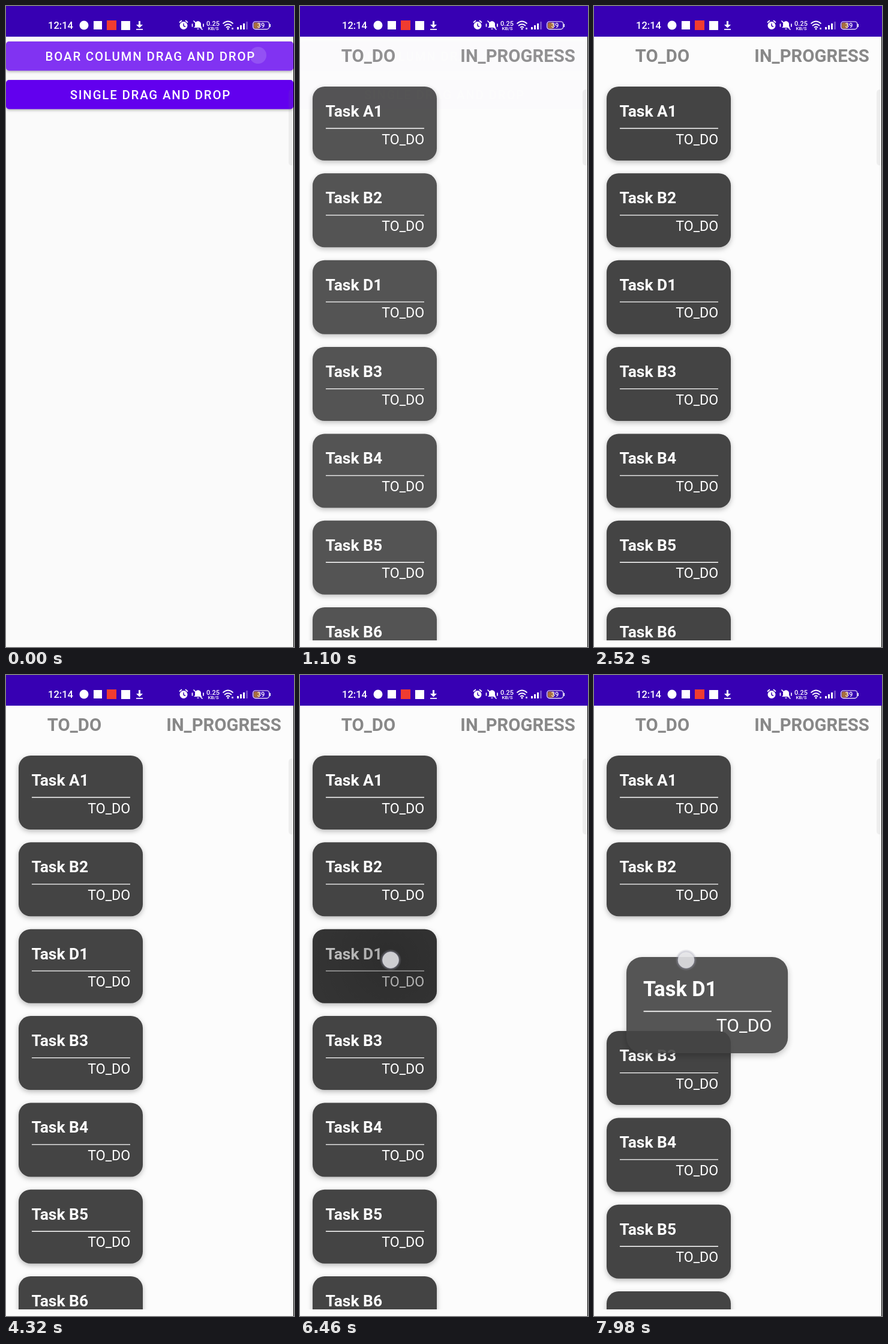
Recreate the animation shown at these times as an HTML page. Size 480 by 1066 pixels, loop 8 s.

```html
<!DOCTYPE html>
<html lang="en">
<head>
<meta charset="utf-8">
<title>Drag and drop board</title>
<style>
  html, body { margin: 0; width: 100%; height: 100%; overflow: hidden; }
  svg { display: block; width: 100vw; height: 100vh; font-family: Roboto, sans-serif; }
  .card { filter: drop-shadow(0 3px 4px rgba(0, 0, 0, .27)); }
  .card rect { fill: #444; }
  .title { font-weight: 700; font-size: 26.4px; fill: #fff; }
  .state { font-weight: 400; font-size: 23.2px; fill: #fff; text-anchor: end; }
  .header { font-weight: 700; font-size: 29.3px; fill: #888; text-anchor: middle; }
  .button rect { fill: #6200ee; filter: drop-shadow(0 2px 2px rgba(0, 0, 0, .27)); }
  .button text { font-weight: 500; font-size: 20.4px; letter-spacing: 1.82px; fill: #fff; text-anchor: middle; }
  .line { fill: none; stroke: #fff; stroke-width: 1.7; stroke-linecap: round; }
</style>
</head>
<body>
<svg id="stage" viewBox="0 0 480 1066" preserveAspectRatio="none">
  <defs>
    <clipPath id="listClip"><rect y="51" width="480" height="1004"/></clipPath>
    <clipPath id="cardClip"><rect width="207" height="123" rx="20"/></clipPath>
    <radialGradient id="rippleFill">
      <stop offset="0" stop-opacity=".34"/>
      <stop offset="1" stop-opacity=".22"/>
    </radialGradient>
    <radialGradient id="glow">
      <stop offset=".7" stop-color="#99a" stop-opacity=".6"/>
      <stop offset="1" stop-color="#99a" stop-opacity="0"/>
    </radialGradient>
  </defs>
  <rect id="backdrop" width="480" height="1066"/>

  <g id="board">
    <text class="header" x="114" y="93">TO_DO</text>
    <text class="header" x="363" y="93">IN_PROGRESS</text>
    <g id="list" clip-path="url(#listClip)"></g>
  </g>
  <g id="dragged"></g>
  <g id="menu"></g>

  <path d="M480 139h-4q-5 0-5 6v114q0 6 5 6h4z" fill="#777" opacity=".1"/>
  <rect x="479" y="51" width="1" height="1015"/>

  <g id="touch">
    <circle r="18" fill="url(#glow)"/>
    <circle r="13.5" fill="#f4f4f4" fill-opacity=".72" stroke="#d4d4e0" stroke-opacity=".6"/>
  </g>
  <circle id="menuTouch" cx="420" cy="82" r="14" fill="#fff"/>

  <rect width="480" height="51" fill="#3700b3"/>
  <g id="status" fill="#fff">
    <text x="70" y="38" font-size="16.5" font-weight="500">12:14</text>
    <circle cx="130" cy="32" r="7.5"/>
    <rect x="146" y="25" width="14" height="14"/>
    <rect x="168" y="24" width="16" height="16" fill="#f03c30"/>
    <rect x="192" y="25" width="15" height="15"/>
    <path d="M221 25h3v6h4l-5.500 5.500L217 31h4zM217 38h11v1.700h-11z"/>

    <circle cx="296" cy="32.500" r="6.500"/>
    <path class="line" d="M289.500 27l3-2.500M302.500 27l-3-2.500"/>
    <path d="M296 29v4l3 1.500" fill="none" stroke="#3700b3" stroke-width="1.400"/>
    <path d="M313 36l2-2v-4q0-4 5-5q5 1 5 5v4l2 2zM318 37.500h4q-2 3-4 0z"/>
    <path class="line" d="M313 25l14 14M310.500 30v4M329 30v4"/>
    <text x="345" y="33" font-size="11" font-weight="500" text-anchor="middle">0.25</text>
    <text x="345.500" y="40" font-size="8" font-weight="500" text-anchor="middle">KB/S</text>
    <path class="line" d="M362 29q8-7 16 0M364.500 32.500q5.500-4.500 11 0M367.500 35.500q2.500-2 5 0"/>
    <circle cx="370" cy="38" r="1.500"/>
    <path d="M376 36h3v3h-3z" opacity=".7"/>
    <path d="M385 35h3v4h-3zM390 32h3v7h-3zM395 29h3v10h-3z"/>
    <path d="M400 26h3v13h-3z" opacity=".3"/>
    <rect x="413" y="27.500" width="10" height="10" rx="2" fill="#a8703c"/>
    <rect x="411.700" y="26" width="27" height="12.600" rx="4" fill="none" stroke="#fff" stroke-width="1.200"/>
    <rect x="439.500" y="30" width="1.500" height="5"/>
    <text x="425" y="36.300" font-size="11" font-weight="500" text-anchor="middle">39</text>
  </g>
</svg>
<script>
const LOOP = 8000, PITCH = 144.35, TOP = 134, LEFT = 21, HELD = 2;
const $ = id => document.getElementById(id);
const clamp = v => Math.min(1, Math.max(0, v));
const ramp = (t, from, to) => clamp((t - from) / (to - from));
const lerp = (a, b, p) => a + (b - a) * p;
const mix = (a, b, p) => `rgb(${a.map((v, i) => Math.round(lerp(v, b[i], p)))})`;
const place = (el, x, y, scale = 1) =>
  el.setAttribute('transform', `translate(${x} ${y}) scale(${scale})`);
const show = (el, opacity) => {
  el.style.opacity = opacity;
  el.style.display = opacity > 0 ? '' : 'none';
};

const card = name => `<g class="card">
  <rect width="207" height="123" rx="20"/>
  <text class="title" x="21.500" y="50">Task ${name}</text>
  <path d="M22 69.500h164" stroke="#fff" stroke-width="1.300"/>
  <text class="state" x="186.300" y="95.500">TO_DO</text></g>`;

const button = (label, y) => `<g class="button">
  <rect y="${y}" width="479" height="48.500" rx="5"/>
  <text x="240.900" y="${y + 32}">${label}</text></g>`;

$('list').innerHTML = ['A1', 'B2', 'D1', 'B3', 'B4', 'B5', 'B6'].map(card).join('');
$('dragged').innerHTML = card('D1');
$('menu').innerHTML = button('BOAR COLUMN DRAG AND DROP', 59) + button('SINGLE DRAG AND DROP', 123);
$('menu').querySelector('rect').insertAdjacentHTML('afterend',
  '<rect id="press" y="59" width="479" height="48.500" rx="5" style="fill:#fff;filter:none"/>');

const cards = [...$('list').children];
cards[HELD].insertAdjacentHTML('beforeend',
  '<g clip-path="url(#cardClip)"><circle id="ripple" cx="130" cy="51" fill="url(#rippleFill)"/></g>');

// Material standard curve, cubic-bezier(.4, 0, .2, 1)
function standardEase(x) {
  let lo = 0, hi = 1;
  for (let i = 0; i < 20; i++) {
    const s = (lo + hi) / 2, r = 1 - s;
    if (1.2 * r * r * s + .6 * r * s * s + s ** 3 < x) lo = s; else hi = s;
  }
  return 3 * lo * lo - 2 * lo ** 3;
}

function draw(t) {
  // The first faded picture is held for a moment.
  const fadeTime = t < 840 ? 0 : t < 960 ? 840 : t;
  const fade = standardEase(ramp(fadeTime, 640, 1340));
  show($('board'), fade);
  show($('menu'), (1 - fade) ** 2);
  $('backdrop').style.fill = mix([250, 250, 250], [252, 252, 252], fade);

  show($('press'), lerp(.2, .14, ramp(t, 0, 160)) * (1 - ramp(t, 280, 420)));
  show($('menuTouch'), .15 * (1 - ramp(t, 0, 160)));

  const lifted = t >= 7580, dragging = t >= 7820;
  const move = ramp(t, 7780, 7980);
  const push = lifted ? lerp(8, 25, move) : 0;
  cards.forEach((el, i) => place(el, LEFT, TOP + i * PITCH + (i > HELD ? push : 0)));
  show(cards[HELD], lifted ? 0 : 1);
  show($('dragged'), dragging ? .9 : 0);
  place($('dragged'), lerp(52, 54, move), lerp(468, 469, move), 1.3);

  show($('ripple'), ramp(t, 6020, 6300));
  $('ripple').setAttribute('r', lerp(40, 155, ramp(t, 6040, 6460)));
  show($('touch'), ramp(t, 5560, 5620));
  place($('touch'), lerp(151, 153.5, move), 474);
}

function tick() {
  draw(performance.now() % LOOP);
  requestAnimationFrame(tick);
}
tick();
</script>
</body>
</html>
```
